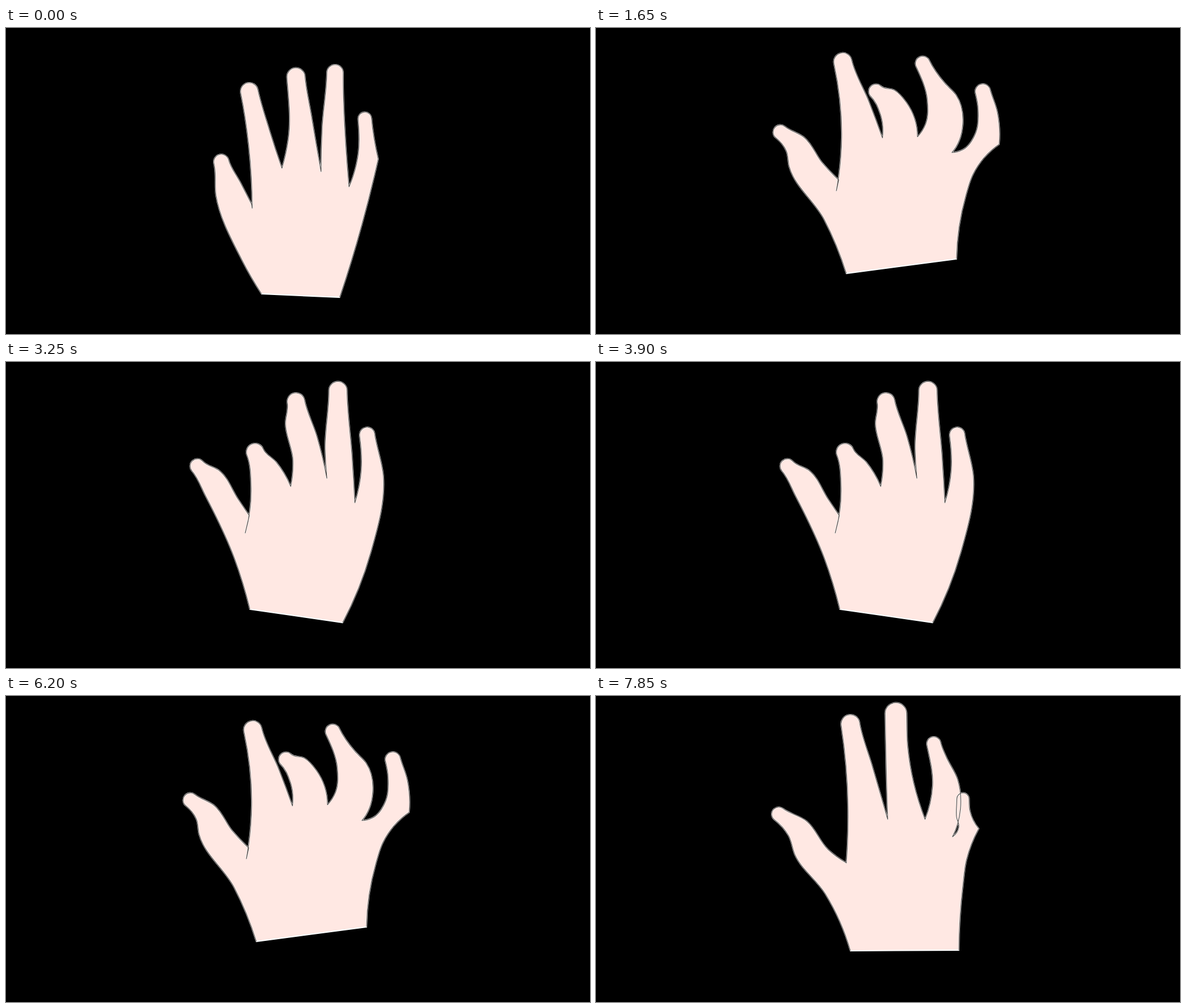
Recreate the animation shown at these times as an HTML page. Size 1001x526 px, loop 8000 ms.

```html
<!DOCTYPE html>
<html lang="en">
<head>
<meta charset="utf-8">
<title>Hand playing five notes</title>
<style>
  html, body { margin: 0; width: 100%; height: 100%; overflow: hidden; background: #000; }
  svg { display: block; width: 100%; height: 100%; }
  path { stroke-linejoin: round; }
  #skin { fill: #ffe8e3; stroke: #fff; stroke-width: 2; }
  #line { fill: none; stroke: #4d4846; stroke-width: 1.1; }
</style>
</head>
<body>
<svg viewBox="0 0 1001 526">
  <g id="hand"><path id="skin"/><path id="line"/></g>
</svg>
<script>
// Vectors
const add = (a, b, k = 1) => [a[0] + b[0] * k, a[1] + b[1] * k];
const dist = (a, b) => Math.hypot(b[0] - a[0], b[1] - a[1]);
const unit = v => add([0, 0], v, 1 / Math.hypot(...v));
const toward = (a, b) => unit(add(b, a, -1));
const mirror = (v, axis) => {
  const k = 2 * (v[0] * axis[0] + v[1] * axis[1]);
  return [axis[0] * k - v[0], axis[1] * k - v[1]];
};

// A hand is a chain of runs from wrist to wrist: thumb, its crease, four fingers, outer side.
// A point with a third number is a round fingertip with that radius; "/" is a sharp corner.
const parse = text => text.split('/').map(run => run.trim().split(/\s+/).map(p => p.split(',').map(Number)));

const rest = parse(`438,457 404,398 360,288 369,230,13 402,266 421,303 / 422,310 /
  416,202 417,109,15 451,174 473,241 /
  484,190 497,84,15.5 523,148 540,247 /
  542,170 564,77,14 583,210 588,273 /
  604,215 615,156,11.5 638,225 / 610,338 572,463`);

const index = parse(`418,425 391,336 342,230 328,179,12.5 366,187 398,236 417,264 / 410,294 /
  420,212 427,155,15 463,172 488,214 /
  492,170 479,106 497,68,15 533,128 550,200 /
  547,150 569,49,15.5 593,160 598,242 /
  609,185 619,125,13 647,198 625,328 577,448`);

const middle = parse(`429,422 391,329 331,238 326,211 316,179,12.5 358,189 388,232 416,261 / 412,280 /
  421,188 423,58,15.5 468,127 491,189 /
  488,150 480,109,12.5 512,107 532,128 551,187 /
  565,165 568,124 560,61,12.5 598,95 617,115 610,214 /
  629,209 651,180 655,140 663,109,13 688,145 691,200 / 646,252 634,288 618,397`);

const little = parse(`436,438 393,340 341,273 330,240 313,203,12 361,215 398,264 428,286 / 429,287 /
  432,192 436,48,16 474,122 500,212 /
  498,150 514,30,18.5 534,84 564,212 /
  577,154 579,82,12 600,104 620,144 611,242 /
  622,225 618,208 629,177,10.5 641,198 656,228 / 635,282 629,325 622,437`);

// The ring note mixes two hands and curls the ring finger
const ring = [
  ...little.slice(0, 4),
  ...parse('571,190 570,150 572,122,12 598,130 614,148 611,214'),
  middle[5], little[6]
];

const R = { d: outline(rest), at: [0, 0] };
const T = { d: R.d, at: [1, 1] };
const I = { d: outline(index), at: [0, 0] };
const M = { d: outline(middle), at: [0, 0] };
const F = { d: outline(ring), at: [-4, 10] };
const L = { d: outline(little), at: [0, 0] };

// Start time and pose of every beat
const beats = [
  [0, R], [500, L], [1000, M], [1500, R], [1650, M], [2550, R], [2750, F], [3250, I],
  [3750, R], [3900, I], [4800, R], [5000, T], [5700, I], [6200, M], [6700, F],
  [7200, L], [7700, R], [7850, L]
];
const LOOP = 8000;

// Curve through points; first and last direction follow an arc unless given
function smooth(pts, first, last) {
  const end = pts.length - 1;
  const dir = pts.map((p, i) => {
    if (!i || i === end) return i ? last : first;
    const a = pts[i - 1], b = pts[i + 1];
    return unit(add(add([0, 0], toward(a, p), 1 / dist(a, p)), toward(p, b), 1 / dist(p, b)));
  });
  const arc = (i, j) => {
    const chord = toward(pts[i], pts[j]);
    return dir[j] ? mirror(dir[j], chord) : chord;
  };
  dir[0] ||= end > 1 || last ? arc(0, 1) : toward(pts[0], pts[1]);
  if (!dir[end]) {
    const chord = toward(pts[end - 1], pts[end]);
    dir[end] = mirror(dir[end - 1], chord);
  }
  return pts.slice(1).map((b, i) => {
    const a = pts[i], h = dist(a, b) / 3;
    return 'C' + [add(a, dir[i], h), add(b, dir[i + 1], -h), b].join(' ');
  }).join('');
}

function outline(runs) {
  let from = runs[0][0], d = 'M' + from;
  runs.forEach((run, n) => {
    const pts = n ? [from, ...run] : run;
    const k = pts.findIndex(p => p.length === 3);
    if (k < 0) d += smooth(pts);
    else {
      const [x, y, r] = pts[k], tip = [x, y];
      const up = toward(add(pts[k - 1], add(pts[k + 1], pts[k - 1], -1), 0.5), tip);
      const side = [up[1], -up[0]];
      const left = add(tip, side, r), right = add(tip, side, -r);
      d += smooth([...pts.slice(0, k), left], null, up);
      d += `A${r} ${r} 0 0 1 ${right}`;
      d += smooth([right, ...pts.slice(k + 1)], add([0, 0], up, -1));
    }
    from = pts.at(-1);
  });
  return d;
}

const [hand, skin, line] = ['hand', 'skin', 'line'].map(id => document.getElementById(id));
let shown;

function draw() {
  const t = performance.now() % LOOP;
  const now = beats.findLast(b => b[0] <= t)[1];
  if (now !== shown) {
    shown = now;
    skin.setAttribute('d', now.d + 'Z');
    line.setAttribute('d', now.d);
    hand.setAttribute('transform', `translate(${now.at})`);
  }
  requestAnimationFrame(draw);
}
draw();
</script>
</body>
</html>
```
